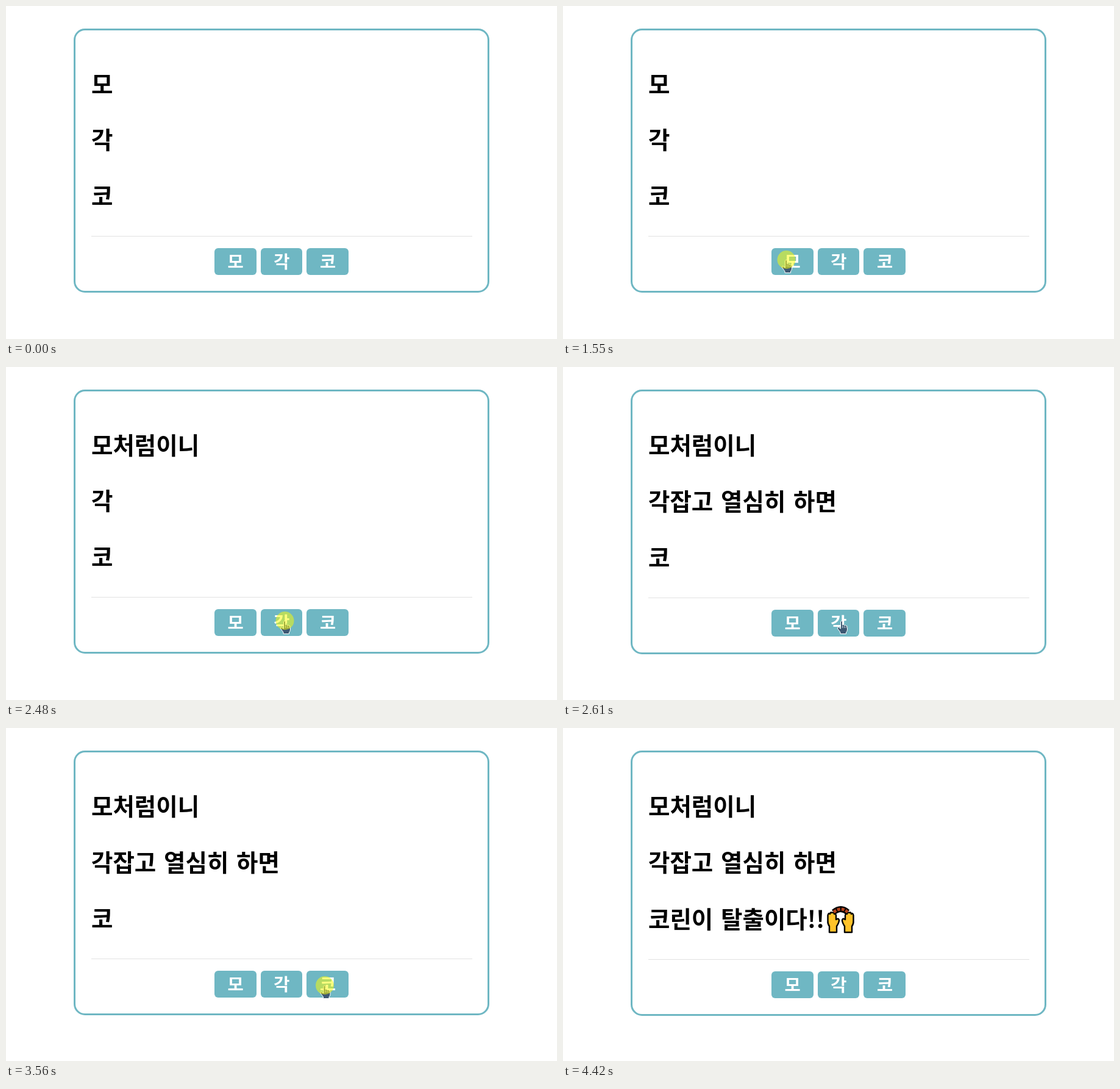
An HTML page for the animation above (5.49 s loop, 904 px wide and 546 px high).

```html
<!DOCTYPE html>
<html lang="ko">
<head>
<meta charset="utf-8">
<title>삼행시</title>
<style>
  html, body { margin: 0; width: 100%; height: 100%; overflow: hidden; background: #fff; }
  svg { display: block; width: 904px; height: 546px; }
  text { font: 900 38.5px "Noto Sans CJK KR", "Noto Sans CJK", sans-serif; word-spacing: 2px; }
  .button rect { fill: #6fb7c3; }
  .button text { font-size: 28.5px; fill: #fff; text-anchor: middle; }
  .pointer { fill: #3d5873; stroke: #fff; stroke-linejoin: round; }
</style>
</head>
<body>
<svg viewBox="0 0 904 546">
  <defs>
    <path id="palm" d="M437 335V325Q434 321 434.5 316V307Q436 302 438 305Q439 301 441 303Q444 301 445 305Q448 304 448 308V314Q452 311 453 315Q453 319 449 325V335Z"
          fill="#ffc229" stroke="#000" stroke-width="2.4" stroke-linejoin="round"/>
    <path id="arc" d="M444 302Q456 292 467 302" fill="none"/>
  </defs>

  <rect id="card" x="112.5" y="38.5" width="679" height="430" rx="17" fill="#fff" stroke="#6fb7c3" stroke-width="3"/>
  <text id="row0" x="140" y="143"></text>
  <text id="row1" x="140" y="234"></text>
  <text id="row2" x="140" y="326"></text>

  <g id="cheer">
    <use href="#palm"/>
    <use href="#palm" transform="translate(911 0) scale(-1 1)"/>
    <use href="#arc" stroke="#000" stroke-width="9.5"/>
    <use href="#arc" stroke="#b5431c" stroke-width="5" stroke-dasharray="5 2"/>
  </g>

  <g id="footer">
    <rect x="140" y="377" width="625" height="1" fill="#e2e2e2"/>
    <g class="button"><rect x="342" y="397" width="69" height="44" rx="6"/><text x="376.5" y="430">모</text></g>
    <g class="button"><rect x="418" y="397" width="68" height="44" rx="6"/><text x="452.3" y="430">각</text></g>
    <g class="button"><rect x="493" y="397" width="69" height="44" rx="6"/><text x="528" y="430">코</text></g>
  </g>

  <g id="cursor">
    <path id="arrow" class="pointer" d="M.5 .5V16L4 12.7L6.5 18.5L9 17.4L6.5 12H11.5Z"/>
    <g id="hand">
      <path class="pointer" d="M-2 1.5Q-.5 -.8 1 1.5V7Q3 5.5 4 7.5Q6 6.5 7 8.5Q9 8 9 10.5V15Q8.5 18 7 19V21.5H-2.5V19L-7 13Q-8 10.5 -5.5 10.5L-2 13Z"/>
      <path d="M1.2 8V12M4.1 8.5V12M6.9 9.5V12" stroke="#fff" stroke-width=".8"/>
    </g>
    <circle id="click" r="15" fill="#ff0" fill-opacity=".5"/>
  </g>
</svg>

<script>
  const LOOP = 5490;
  const TICK = 1000 / 15; // the pointer moves at 15 frames per second

  const rows = [
    { press: 1550, release: 1610, short: "모", full: "모처럼이니" },
    { press: 2480, release: 2610, short: "각", full: "각잡고 열심히 하면" },
    { press: 3560, release: 3690, short: "코", full: "코린이 탈출이다!!" }
  ];

  // The pointer enters, visits each button and leaves.
  const outside = { x: 321, y: 559 };
  const first = { x: 366.5, y: 416 };
  const second = { x: 457.5, y: 416 };
  const third = { x: 523, y: 422 };
  const exit = { x: 586, y: 468 };
  const glides = [
    { start: 420, steps: 7, from: outside, to: first },
    { start: 1870, steps: 6, from: first, to: second },
    { start: 3140, steps: 6, from: second, to: third },
    { start: 4290, steps: 3, from: third, to: exit }
  ];

  const $ = id => document.getElementById(id);
  const show = (id, on) => $(id).setAttribute("display", on ? "inline" : "none");
  const move = (id, x, y) => $(id).setAttribute("transform", `translate(${x} ${y})`);
  const mix = (a, b, k) => a + (b - a) * k;

  function pointerAt(t) {
    const glide = glides.filter(g => g.start <= t).pop();
    if (!glide) return null;
    const step = Math.floor((t - glide.start + 5) / TICK) + 1;
    const progress = Math.min(1, step / glide.steps);
    if (glide.to === exit && progress === 1) return null;
    const eased = Math.sin(progress * Math.PI / 2);
    return { x: mix(glide.from.x, glide.to.x, eased), y: mix(glide.from.y, glide.to.y, eased) };
  }

  function draw(t) {
    // The second and third rows each grow by one pixel when filled in.
    let drop = 0;
    rows.forEach(({ release, short, full }, i) => {
      const filled = t >= release;
      if (i && filled) drop++;
      $("row" + i).textContent = filled ? full : short;
      move("row" + i, 0, drop);
    });
    move("footer", 0, drop);
    $("card").setAttribute("height", 430 + drop);
    show("cheer", t >= rows[2].release);

    const pointer = pointerAt(t);
    show("cursor", pointer);
    if (!pointer) return;
    const onButton = pointer.y < 441 + drop;
    show("arrow", !onButton);
    show("hand", onButton);
    show("click", rows.some(r => t >= r.press && t < r.release));
    move("cursor", pointer.x, pointer.y);
  }

  const start = performance.now();
  function tick() {
    draw((performance.now() - start) % LOOP);
    requestAnimationFrame(tick);
  }
  tick();
</script>
</body>
</html>
```
